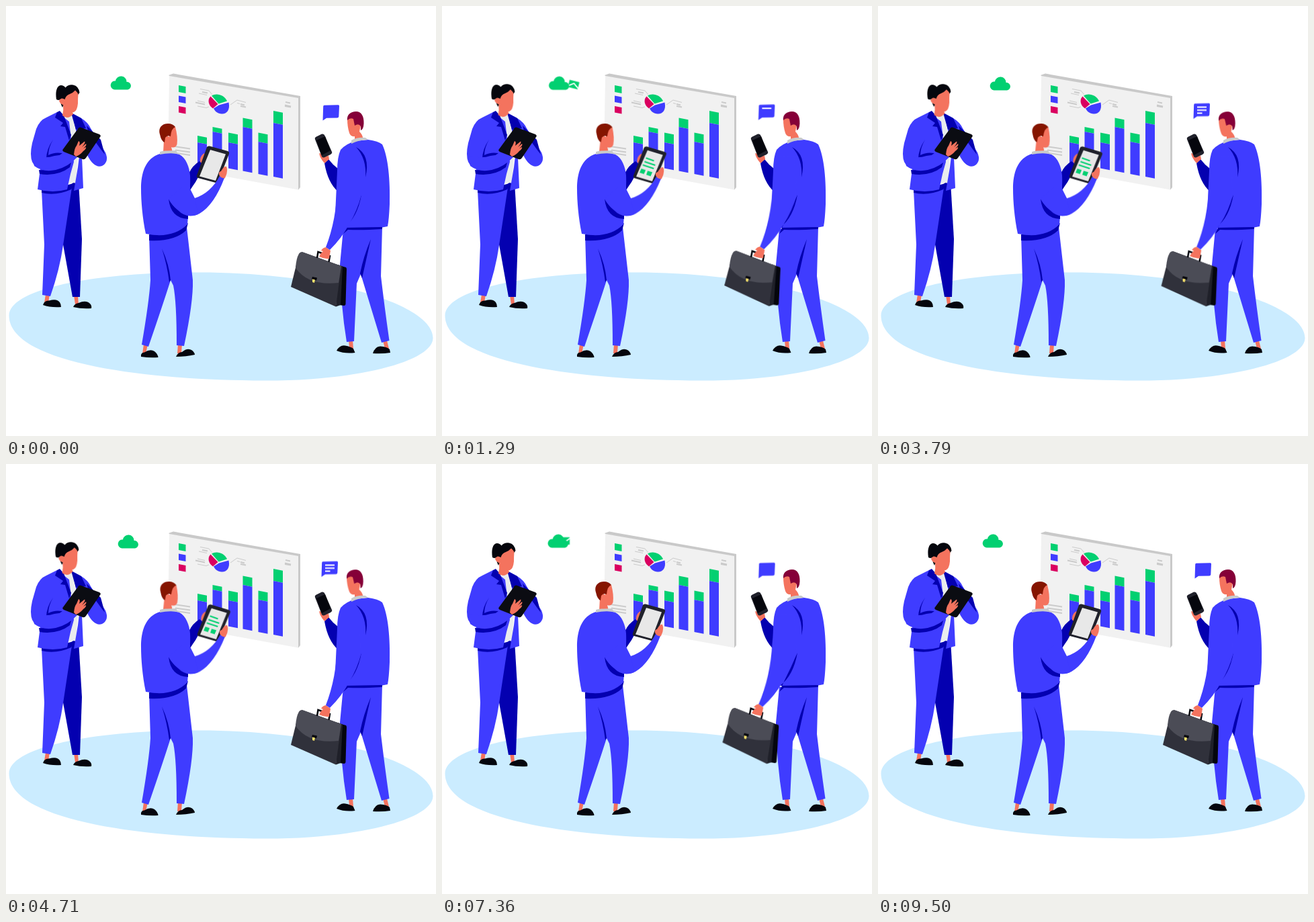
These frames come from a looping animation (640x640 px, 9.57 s). An HTML page:

```html
<!DOCTYPE html>
<html lang="en">
<head>
<meta charset="utf-8">
<title>Team at the board</title>
<style>
  html, body { margin: 0; width: 100%; height: 100%; overflow: hidden; background: #fff; }
  svg { display: block; width: 100vw; height: 100vh; }

  .blue { fill: #3f3cff; }
  .navy { fill: #0400b0; }
  .skin { fill: #f4735e; }
  .green { fill: #02d071; }
  .pink { fill: #da0060; }
  .grey { fill: #c8cacb; }
  .ink { fill: #05060d; }
  .line { fill: none; stroke-width: 2; stroke: #cbcbcb; }

  .drift, .look, .glance, .nod, .mail, .draw, .pop {
    animation: 9.57s cubic-bezier(.37, 0, .63, 1) calc(var(--d, 0s) - 9.57s) infinite both;
  }
  .drift { animation-name: drift; }
  .look { animation-name: look; }
  .glance { animation-name: glance; }
  .nod { animation-name: nod; }
  .mail { animation-name: mail; animation-timing-function: linear; }
  .draw { animation-name: draw; stroke-dasharray: 1 2; }
  .pop { animation-name: pop; }

  .cloud { --x: 11px; --y: 1px; }
  .bubble { --x: -2px; --y: -2.5px; }
  @keyframes drift {
    0%, 86.57%, 100% { transform: none; }
    36.57%, 50% { transform: translate(var(--x), var(--y)); }
  }

  /* middle man: head and tablet */
  .man-head { transform-origin: 242px 216px; --r: 2.5deg; }
  .tablet { transform-origin: 270px 300px; --r: 1.2deg; }
  @keyframes look {
    0%, 60%, 100% { transform: rotate(0deg); }
    9.4%, 50% { transform: rotate(var(--r)); }
  }

  .woman-head { transform-origin: 92px 160px; }
  @keyframes glance {
    0%, 73%, 100% { transform: none; }
    10%, 63% { transform: translate(-.5px, -1px) rotate(-1deg); }
  }

  .right-head { transform-origin: 525px 196px; }
  @keyframes nod {
    0%, 11%, 73%, 100% { transform: rotate(0deg); }
    22%, 63% { transform: rotate(-2deg); }
  }

  .swing {
    transform-origin: 525px 225px;
    animation: swing 2.3925s cubic-bezier(.37, 0, .63, 1) infinite alternate;
  }
  @keyframes swing { to { transform: rotate(2deg); } }

  /* bubble rows and tablet page */
  @keyframes draw {
    0%, 9.3%, 68%, 100% { stroke-dashoffset: 1.03; }
    13.9%, 65% { stroke-dashoffset: 0; }
  }
  @keyframes pop {
    0%, 4%, 55%, 100% { opacity: 0; }
    8%, 51% { opacity: 1; }
  }

  @keyframes mail {
    0%, 7.3% { transform: translate(305px, 232px) rotate(194deg) scale(.3); opacity: 0; }
    8.3% { transform: translate(287px, 213px) rotate(194deg); opacity: 1; }
    13.48% { transform: translate(196px, 117px) rotate(194deg); opacity: 1; }
    16.2% { transform: translate(177px, 117px) rotate(180deg); opacity: 1; }
    16.3% { transform: translate(177px, 117px); opacity: 0; }
    75.7% { transform: translate(177px, 115px); opacity: 0; }
    75.8% { transform: translate(177px, 115px); opacity: 1; }
    76.9% { transform: translate(182.5px, 114.5px); opacity: 1; }
    83.6% { transform: translate(184px, 104px); opacity: 1; }
    87.8% { transform: translate(165px, 93px) rotate(-14deg); opacity: 1; }
    93% { transform: translate(122px, 170px) rotate(-20deg) scale(.6); opacity: 1; }
    94%, 100% { transform: translate(116px, 190px) rotate(-20deg) scale(.3); opacity: 0; }
  }
</style>
</head>
<body>
<svg viewBox="0 0 640 640">
  <path fill="#cbecff" d="M4.500 461C5 421 130 396.500 285 396.500C470 396 635 442 635.500 494C635 531 515 558 385 557.500C190 557 5 528 4.500 461Z"/>

  <!-- board -->
  <g>
    <path fill="#c9c9c9" d="M242 103L249 100.500L438 134V270L435 273.500Z"/>
    <path fill="#f1f1f1" d="M243 104L435 137V273.500L241 238Z"/>
    <path class="green" d="M257 118l10.500 2v10l-10.500-2z"/>
    <path class="blue" d="M257 133.500l10.500 2v9.500l-10.500-2z"/>
    <path class="pink" d="M257 149l10.500 2v9.500l-10.500-2z"/>
    <path class="green" d="M306 133.500C313 129 325 132 329 141.500L316.500 145.500Z"/>
    <path class="pink" d="M304.500 134.500L315.500 146L308 152.500C301 148 299.500 139 304.500 134.500Z"/>
    <path class="blue" d="M331.500 143.500C334 155 328 161 321 160.500C315 160 311 157 309 152.500L317 147.500Z"/>
    <path class="line" style="stroke-width:1" d="M289 123.500L302 126L307 132M287 130L299 132.500M285 141L296 143.500M285 149L298 151.500L302 150M334 147L344 140L357 143.500M344 144.500L348 145.500"/>
    <path class="line" d="M292 128L300 129.500M282 143.500L296 146.500M349 146L355 147.500M349 149L357 150.500M416 143L423 144.500M415 147.500L424 149.500M415 149L424 150.500"/>
    <path class="line" d="M248 208.500L274 212.500M252 214.500L274 217.500M248 218L274 222"/>
    <g id="bars"></g>
  </g>

  <!-- cloud and mail -->
  <g class="mail">
    <path class="green" d="M-7.500-5.500h15v11h-15z"/>
    <path fill="none" stroke="#fff" stroke-width="1.700" d="M-8-4L0 2L8-4"/>
  </g>
  <path class="drift cloud green" d="M161.500 124.500A6.500 6.500 0 0 1 163 111.500A8.300 8.300 0 0 1 179.500 113A5.800 5.800 0 0 1 181 124.500Z"/>

  <!-- bubble -->
  <g class="drift bubble">
    <path class="blue" d="M473.800 147.700L494.500 147.200Q496 147.200 496 148.700L495.300 164.500Q495 166.500 493 166.500L477 166.800L471.500 170.500L472.200 149.500Q472.200 147.800 473.800 147.700Z"/>
    <g fill="none" stroke="#fff" stroke-width="2">
      <path class="draw" pathLength="1" d="M477 153H491"/>
      <path class="draw" pathLength="1" style="--d:.4s" d="M477 157.500H491"/>
      <path class="draw" pathLength="1" style="--d:.8s" d="M477 162H484.500"/>
    </g>
  </g>

  <!-- woman -->
  <g>
    <path class="skin" d="M59 429h6l-2 13h-6zM101 431h6l1 13h-5z"/>
    <path class="ink" d="M55 445Q57 438 64 438.500Q76 435 80 441Q82 444 82 448Q66 449 55 445ZM100 448Q102 443 108 442Q119 437 125 443Q128 446 127 450Q112 451 100 448Z"/>
    <path class="navy" d="M85 268L108 262L113 347L110 433L99 433L85 355Z"/>
    <path class="blue" d="M53 274L57 355L54 430L66 432Q80 392 85 356L98 270Z"/>
    <path class="navy" d="M53 274Q76 276 92 270L102 261V264L97 273Q75 283 53 278Z"/>
    <path fill="#e9ecee" d="M86 163L99 160L108 215L104 263L91 264Z"/>
    <path class="blue" d="M76 158L60 166Q50 170 45 183L39 204Q35 222 39 232Q43 240 51 242L47 273Q70 279 91 273L96 250L101 232L94 172Z"/>
    <path class="blue" d="M99 160L112 167Q122 173 126 182L148 218Q154 232 143 238Q131 242 121 222L113 225L115 271L101 275L107 240L110 215Z"/>
    <path class="navy" d="M76 158L80 156L86 163L97 192L94 200L88 180L81 179L85 174L73 166ZM97 159L112 167L119 182L104 184ZM120 178L141 199L147 221Q136 207 122 186Z"/>
    <path class="navy" d="M70 199Q60 213 60 228Q73 228 84 219Q72 217 63 222Q63 211 70 199ZM49 244Q75 246 98 230L95 240Q77 254 50 250Z"/>
    <path class="blue" d="M39 222Q58 228 72 223L101 219L106 225Q92 240 74 244Q55 248 42 238Z"/>
    <path fill="#0b0c12" d="M108 181.500Q110 180 112 181L139 191Q142 193 140 195L119 226Q117 229 114 228L86 217Q83 215 85 213Z"/>
    <path class="skin" d="M101 221Q102 211 105 208L108 201Q111 202 109 208L117 201.500Q119 203 113 210L119 205Q121 207 115 212L119 210Q120 212 115 216Q110 222 104 224Z"/>
    <g class="glance woman-head">
      <path class="skin" d="M85 147L97 152L100 161Q92 170 84 163Q86 155 85 147Z"/>
      <path class="ink" d="M75 139C73 127 76 118 82 118Q86 118 88.500 121.500Q93 116.500 100 117.500Q108 119 109.500 129L106.500 133L96 132L88 141L84 151Q81 146 81 139Q78 141 75 139Z"/>
      <path class="skin" d="M87.500 139Q89 133 95 131Q100 129 103 125.500Q106 128 107.500 131Q107 137 107 145Q106 156 101 158Q92 160 87 148Q80 146 79 141Q82 135 87.500 139Z"/>
    </g>
  </g>

  <!-- middle man -->
  <g>
    <path class="skin" d="M205 503h6l-3 15h-5zM256 503h6l-1 14h-6z"/>
    <path class="ink" d="M201 522Q200 516 206 515.500Q215 510 221 514Q226 518 226.500 523Q214 524 201 522ZM253 522Q256 515 262 515Q270 508 277 512.500Q281 516 281 519Q268 522 253 522Z"/>
    <path class="blue" d="M213 340L215 408Q213 440 202 504L212 507Q235 440 245 408L249 416Q254 440 254 505L265 506Q279 440 278 408L268 320Z"/>
    <path class="navy" d="M213 340Q245 343 271 323L268 334Q250 351 213 349ZM232 361Q243 385 245 408L243 411Q240 386 232 361Z"/>
    <path class="navy" d="M272 249Q278 237 288 231L294 236Q287 256 278 268L274 274Z"/>
    <path class="blue" d="M229 220Q245 217 258 221C268 226 273 240 274 252C275 275 272 300 270 325Q248 347 208 339C203 315 201 290 201 272C201 249 207 227 229 220Z"/>
    <g class="look man-head">
      <path class="skin" d="M243 182L252 180Q256 195 254.500 206Q252 212 246 210L248 218H234L235 199Q238 191 243 195Z"/>
      <path fill="#851500" d="M229 191C226 182 232 175 241 175Q248 175 252 180Q246 182 245 194Q240 192 237 196L236 203Q231 201 229 191Z"/>
    </g>
    <path class="grey" d="M229 220V217Q233 215 240 215.500L253 215L256 220Q242 218 229 221Z"/>
    <path class="navy" d="M242 287Q252 305 271 311V317Q245 316 242 287Z"/>
    <g class="look tablet">
      <path class="skin" d="M289 232Q288 224 295 219L298 225L294 236Z"/>
      <path fill="#20212b" d="M299 210Q300 208 303 208.500L330 216Q333 217 332 220L316 261Q315 264 312 263L286 256Q283 255 284 252Z"/>
      <path fill="#e8e8e8" d="M304 214L327 220.500L312 260L288 253.500Z"/>
      <g class="pop green"><path d="M295.500 241.500l6.500 2-2.500 6-6.500-2zM305 244.500l7 2-2.500 6-6.500-2z"/></g>
      <g fill="none" stroke="#02d071" stroke-width="2">
        <path class="pop" d="M302 225.500L314 229.500"/>
        <path class="pop" style="--d:.08s" d="M300 231L316 236"/>
        <path class="pop" style="--d:.16s" d="M297.500 236L314 241"/>
      </g>
      <path class="skin" d="M318 253Q315 247 320 246Q325 237 328 239Q331 246 326 256L322 258Z"/>
      <path class="blue" d="M262 282L281 286Q305 278 318 253Q321 257 325 256Q310 296 288 309Q270 318 256 304Q247 297 242 287Z"/>
    </g>
    <path class="blue" d="M242 287Q252 305 272 311Q280 313 286 310L281 286L273 270L262 270Z"/>
  </g>

  <!-- right man -->
  <g>
    <path class="skin" d="M510 497h6l1 13h-6zM561 498h6l3 12h-6z"/>
    <path class="ink" d="M492 513Q497 504 505 505.500Q513 507 517 510L519.500 516Q504 518 492 513ZM546 517Q549 507 557 506.500Q567 507 571 511L572 516Q560 518 546 517Z"/>
    <path class="blue" d="M502 332L497 385Q498 445 507 500L518 499L522 413L528 399L559 501L570.500 498Q563 445 558 402L560 328Z"/>
    <path class="navy" d="M543 347Q532 373 527 398L530 405Q536 378 543 347Z"/>
    <path class="navy" d="M474 234L480 228Q486 236 494 242V276Q479 263 474 234Z"/>
    <path class="skin" d="M466 219L477 222L481 228L474 234Q467 226 466 219Z"/>
    <path fill="#20212b" d="M460 198.500Q459 196 462 194.500L470 190.500Q473 190 474 192L485 217Q486 219 483 221L474 225.500Q471 226 470 224Z"/>
    <path class="ink" d="M462 200L475 194L483 215L470 222Z"/>
    <path class="skin" d="M471 227L480 222.500L481 228L476 231Z"/>
    <path class="blue" d="M498 214Q506 205 520 201L539 199Q554 201 560 206C569 225 572 260 571 295Q570 318 568 328Q535 335 506 331L490 310L493 245Q493 225 498 214Z"/>
    <path class="navy" d="M529 281Q523 315 503 330L560 329V332Q530 334 509 333L502 339Z"/>
    <path class="navy" d="M521 210Q543 222 535 255Q537 227 521 210Z"/>
    <g class="nod right-head">
      <path class="skin" d="M508 168Q512 164 518 166L520 177Q524 173 528 178L526 187Q530 190 532 199H519V194Q513 195 511 189Q508 180 508 168Z"/>
      <path fill="#850038" d="M508 170C507 162 513 157 521 157C529 157 533 164 532.500 175Q532 184 528 185V179Q525 174 519 178L517 168Q512 166 508 170Z"/>
    </g>
    <path class="grey" d="M514 205V200Q523 195 535 196L539 199Q525 199 514 205Z"/>

    <g class="swing">
      <path class="ink" d="M499 387L506 389Q507 390 507 392L505.500 444Q505 446 503 446L496 445Z"/>
      <path fill="#1f2029" d="M494 385L501 387.500L498 445L491 447.500Z"/>
      <path fill="#30313b" d="M436 369Q438 365.500 442 366.500L499 387L491 447.500L424 418Z"/>
      <path fill="#4b4c56" d="M436 369Q438 365.500 442 366.500L499 387L495 412Q450 417 431 390Q432 375 436 369Z"/>
      <path fill="none" stroke="#05060d" stroke-width="2.500" d="M463 375L464.500 366L482 372L480.500 381"/>
      <path class="ink" d="M456 403l7 1.500-1 4-7-2z"/>
      <path fill="#f7e26b" d="M456 406.500l4 1-1 4.500-3-1z"/>
      <path class="skin" d="M476 359L483 364L481 376Q474 377 466 373Q469 367 472 365L469 364Q471 360 476 359Z"/>
      <path class="blue" d="M493 268Q492 318 476 359L482 363Q500 345 510 326Q523 305 529 281L525 225L498 225Z"/>
    </g>
  </g>
</svg>
<script>
  // x, top, split, bottom of each sloped bar
  const bars = [
    [285, 193, 203, 233], [307.5, 180, 187, 238], [331, 188.5, 203, 241.5],
    [352.5, 166.5, 180, 245.5], [375.5, 188.5, 202, 250], [398, 156, 174, 254]
  ];
  const w = 14, slope = 2.8;
  const slab = (x, y, end, cls) =>
    `<path class="${cls}" d="M${x} ${y}l${w} ${slope}V${end + slope}l${-w} ${-slope}z"/>`;
  document.getElementById('bars').innerHTML = bars.map(([x, top, mid, end]) =>
    slab(x, top, mid, 'green') + slab(x, mid, end, 'blue')).join('');
</script>
</body>
</html>
```
